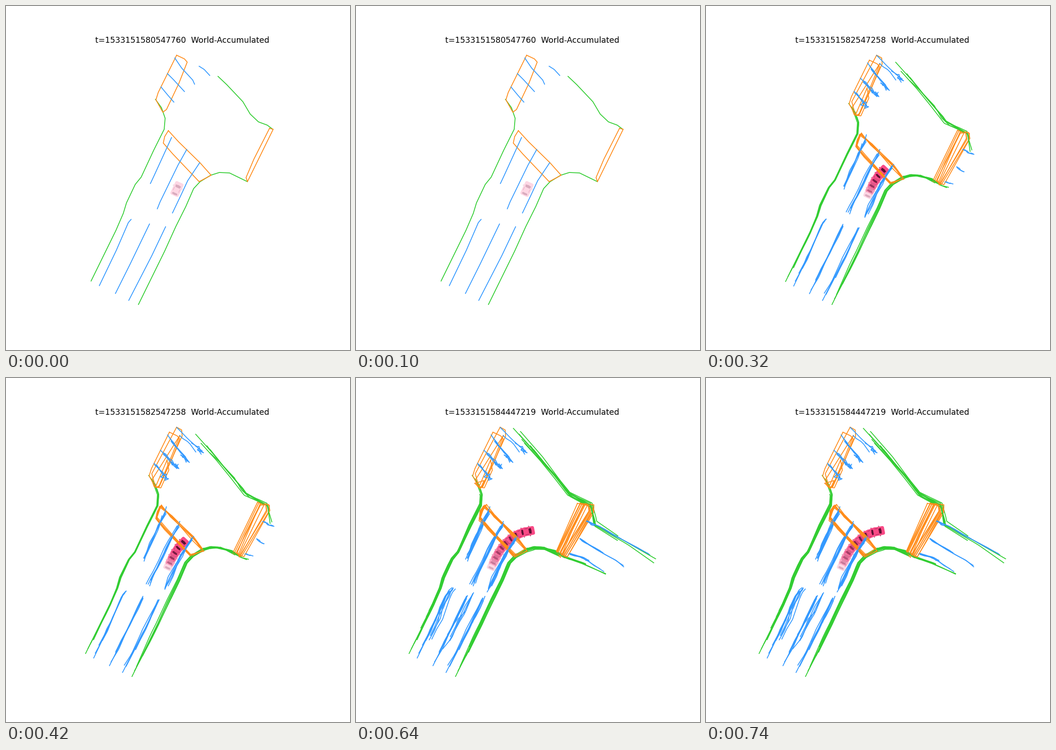
A matplotlib script that plays this animation: 748 by 748 pixels, repeating every 800 ms.

```python
import numpy as np
import matplotlib.pyplot as plt
from matplotlib.animation import FuncAnimation
from matplotlib.patches import FancyBboxPatch, Polygon
from matplotlib.transforms import Affine2D

SIZE = 748
GREEN, BLUE, ORANGE = "#32cd32", "#3399ff", "#ff8c1a"
STAMPS = [1533151580547760, 1533151581546950, 1533151582547258,
          1533151583547025, 1533151584447219]
SHIFT = [0, 0, 10, 30, 67.6]   # how far the view has panned right
ZOOM = 0.98                    # the first view is slightly closer
ANCHOR = np.array([284, 649]) - ZOOM * np.array([288, 649])
rng = np.random.default_rng(11)
strokes = []                   # (step, colour, points)


def first(*pts):
    """Points of the first view in world coordinates."""
    return ANCHOR + ZOOM * np.array(pts, float)


def sketch(step, color, path, spread=0.0, lo=0.0, hi=1.0, slide=0.0):
    """Detect a line: trim it, slide it along itself, displace and bend it."""
    path = np.array(path, float)
    d = np.r_[0, np.cumsum(np.hypot(*np.diff(path, axis=0).T))]
    s = np.linspace(lo, hi, 28) * d[-1]
    s = np.sort(np.r_[s, d[(d > s[0]) & (d < s[-1])]])
    bend = rng.normal(0, spread * 0.6, (2, 6))
    shift = rng.normal(0, spread * 0.8, 2) + rng.normal(0, slide) * (path[-1] - path[0]) / d[-1]
    knots = np.linspace(s[0], s[-1], 6)
    strokes.append((step, color, np.column_stack(
        [np.interp(s, d, path[:, i]) + np.interp(s, knots, bend[i]) + shift[i]
         for i in (0, 1)])))


def outline(step, path, spread=0.0):
    p = np.array(path, float)
    p = p + rng.normal(0, spread, p.shape)
    strokes.append((step, ORANGE, np.vstack([p, p[:1]])))


# Road borders
left = first((325, 203), (338, 221), (346, 244), (344, 268), (321, 314), (294, 372),
             (281, 388), (262, 428), (255, 451), (239, 488), (185, 598))
right = first((525, 382), (486, 363), (464, 362), (445, 368), (422, 382), (408, 397),
              (391, 436), (369, 480), (345, 533), (288, 649))
top = first((461, 153), (480, 171), (515, 208), (531, 235), (549, 252), (568, 259),
            (580, 268))
top_exit = [(410, 108), (470, 176), (530, 251), (560, 266), (578, 276), (588, 318),
            (640, 350), (716, 395)]
low_exit = [(438, 372), (468, 369), (500, 376), (520, 389), (561, 403), (612, 425)]

# Crossings
crossing = first((353, 271), (375, 295), (422, 341), (446, 368), (420, 382), (362, 321),
                 (342, 298), (345, 284))
far_crossing = first((371, 107), (388, 115), (394, 122), (376, 168), (349, 225),
                     (341, 231), (326, 204), (331, 188))
side_crossing = first((573, 266), (581, 268), (525, 382), (522, 373), (539, 333))

# Lane dividers
middle = [first((360, 286), (322, 369), (314, 386)),
          first((393, 312), (374, 346), (335, 426), (329, 441)),
          first((421, 341), (395, 380), (382, 408), (362, 450))]
near = [first((272, 464), (266, 471), (240, 531), (203, 608)),
        first((312, 474), (270, 561), (238, 625)),
        first((347, 480), (317, 543), (267, 640))]
far = [first((367, 113), (382, 135), (406, 161), (410, 170)),
       first((351, 147), (364, 160), (388, 186)),
       first((337, 176), (352, 194), (365, 209))]
far_late = [[(381, 108), (410, 137), (436, 160)], [(388, 124), (411, 143), (424, 160)]]
exit_lanes = [[(570, 312), (597, 324), (719, 392)], [(556, 350), (658, 414)],
              [(533, 383), (563, 392), (612, 425)]]

for path in (left, right, top):
    sketch(0, GREEN, path)
for path in (crossing, far_crossing, side_crossing):
    outline(0, path)
for path in middle + near + far + [first((420, 131), (431, 138), (443, 151))]:
    sketch(0, BLUE, path)

# Two new detections per step; the range behind shrinks, the exit opens up
for k in range(1, 9):
    step = (k + 1) // 2
    reach = ((step - 1) / 3) ** 1.7
    sketch(step, GREEN, left, 1.8, 0.02 * k, 1 - 0.03 * k)
    sketch(step, GREEN, right, 1.8, 0.02, 1 - 0.03 * k)
    sketch(step, GREEN, top_exit, 1.5 + 0.7 * step, rng.uniform(0, 0.15), 0.58 + 0.42 * reach)
    sketch(step, GREEN, low_exit, 1.2, 0, 0.47 + 0.53 * reach)
    outline(step, crossing, 1.8)

    a, b = rng.uniform(-11, 2), rng.uniform(-3, 11)
    outline(step, [(564 + a, 273), (573 + b, 276), (574 + b, 290), (516 + b, 389),
                   (512 + a, 379)], 1.5)

    for lane in middle:
        sketch(step, BLUE, lane, 2.2, slide=5)
    for lane in near:
        sketch(step, BLUE, lane, 1.5, 0, 1 - 0.08 * k, slide=5)
    if step >= 3:
        for lane in near[:2]:
            sketch(step, BLUE, lane + [rng.uniform(6, 16), -8], 3, 0, rng.uniform(0.5, 0.8))
    if step >= 2:
        for lane in exit_lanes:
            sketch(step, BLUE, lane, 1.2, 0, reach * rng.uniform(0.8, 1))

# The far side is seen well only while it lies ahead
outline(1, [(381, 107), (392, 113), (393, 126), (343, 237), (335, 238), (327, 208)])
outline(1, [(388, 125), (370, 170), (342, 237), (332, 236), (327, 222)])
outline(2, [(361, 178), (363, 200), (345, 238), (334, 236)], 1)
outline(4, [(326, 229), (346, 223), (338, 241)])
for lane in far_late:
    sketch(1, BLUE, lane, 0.8)
for step in (1, 2):
    for lane in far:
        sketch(step, BLUE, lane, 1.2, 0.1 * step)
for lane in far + far_late[:1]:
    scribble = lane[-1] + rng.uniform(-13, 3, (7, 1)) + rng.normal(0, 3, (7, 2))
    strokes.append((2, BLUE, scribble))


def car_trail():
    """Half-second poses of the turn: x, y, heading in degrees."""
    x, y, poses = 366, 403, []
    for k in range(9):
        poses.append((x, y, 65 - 54 * (k / 8) ** 1.6))
        ahead = np.radians(65 - 54 * ((k + 0.5) / 8) ** 1.6)
        stride = 11.5 + 0.5 * k
        x, y = x + stride * np.cos(ahead), y - stride * np.sin(ahead)
    return poses


def draw_car(ax, x, y, heading, alpha):
    tr = Affine2D().rotate_deg(-heading).translate(x, y) + ax.transData
    z = 1 + alpha / 2

    def part(shape, color, layer=0.0):
        shape.set(transform=tr, facecolor=color, edgecolor="none", alpha=alpha,
                  zorder=z + layer)
        ax.add_patch(shape)

    part(FancyBboxPatch((-11.5, -5.5), 23, 11, boxstyle="round,pad=4"), "#f94a86")
    for s in (-1, 1):
        part(Polygon([(-6, 7 * s), (3, 7 * s), (1, 5.8 * s), (-5, 5.8 * s)]), "#a82c5c", .01)
        part(Polygon([(4, 9.5 * s), (6, 9.5 * s), (5, 11.5 * s), (3, 11.5 * s)]), "#b03866", .01)
    for back, front in ((3, 8), (-9, -12.5)):
        bulge = front + np.sign(front)
        part(Polygon([(back, -5), (front, -6.3), (bulge, 0), (front, 6.3), (back, 5)]),
             "#5c1033", .02)


trail = car_trail()
fig = plt.figure(figsize=(SIZE / 100, SIZE / 100), dpi=100, facecolor="white")
ax = fig.add_axes([0, 0, 1, 1])
title = fig.text(383 / SIZE, 1 - 79.5 / SIZE, "", fontsize=12.5, ha="center",
                 va="baseline", family="DejaVu Sans")


def update(i):
    ax.clear()
    ax.axis("off")
    corner, span = (ANCHOR, ZOOM * SIZE) if i == 0 else ((SHIFT[i], 0), SIZE)
    ax.set(xlim=(corner[0], corner[0] + span), ylim=(corner[1] + span, corner[1]))
    for pose, alpha in zip(trail, np.linspace(0.22, 1, 2 * i + 1)):
        draw_car(ax, *pose, alpha)
    for step, color, p in strokes:
        if step <= i:
            ax.plot(*p.T, color=color, lw=1.3, zorder=3, scalex=False, scaley=False)
    title.set_text(f"t={STAMPS[i]}  World-Accumulated")
    return []


anim = FuncAnimation(fig, update, frames=5, interval=160, repeat=True, repeat_delay=0)
plt.show()
```
